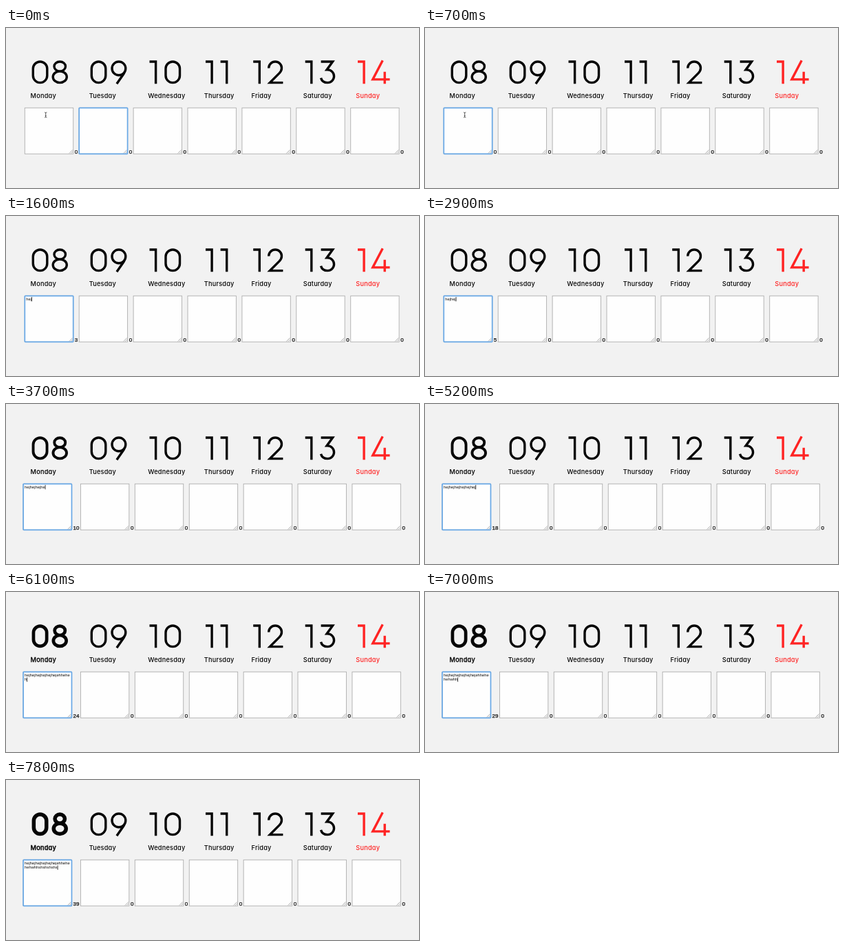
Recreate the animation shown at these times as an HTML page. Size 600 by 233 pixels, loop 8000 ms.

```html
<!DOCTYPE html>
<html lang="en">
<head>
<meta charset="utf-8">
<title>Week planner</title>
<style>
  html, body { margin: 0; width: 100%; height: 100%; overflow: hidden; background: #f2f2f2; }
  svg { display: block; width: 100vw; height: 100vh; }
  .label { font: 500 9.2px Inter, Lato, sans-serif; font-feature-settings: "cv11"; letter-spacing: 0.2px; }
  .count { font: 8px "Liberation Sans", Arial, sans-serif; fill: #111; stroke: #111; stroke-width: 0.25; }
  .typed { font: 5.8px "Liberation Sans", Arial, sans-serif; fill: #111; }
</style>
</head>
<body>
<svg id="stage" viewBox="0 0 600 233"></svg>
<script>
const LOOP = 8000, STEP = 100, LAST = 7800;
const FOCUS_AT = 200, COUNT_LAG = 80, WRAP = 24;
const TEXT = "hej".repeat(6) + "ehhehe" + "hehwhhshshshshs";
const KEYS = [
  1000, 1200, 1500, 2700, 2780, 2850, 3100, 3200, 3300, 3600, 3700, 3850,
  4180, 4400, 4500, 4700, 4900, 5050, 5400, 5500, 5600, 5750, 5870, 5960, 6050,
  6300, 6450, 6600, 6800, 6950, 7050, 7150, 7230, 7310, 7400, 7480, 7560, 7640, 7700
];
const WEIGHTS = [3.4, 3.9, 4.7, 5.5];
const BOX = { x: 27.3, y: 116.3, w: 70.4, h: 67, pitch: 78.9 };
const DIGIT = 4.45;
const INK = "#050505", RED = "#ff2323";

// name, label x, then digit and left edge pairs
const DAYS = [
  ["Monday", 35.6, "0", 37.6, "8", 66.5],
  ["Tuesday", 120.7, "0", 122.6, "9", 152.3],
  ["Wednesday", 206.3, "1", 208.5, "0", 230.3],
  ["Thursday", 287.8, "1", 290, "1", 311.6],
  ["Friday", 356.6, "1", 359.2, "2", 380],
  ["Saturday", 431.8, "1", 434.7, "3", 456],
  ["Sunday", 508.3, "1", 511, "4", 530]
];

const stage = document.getElementById("stage");

function add(parent, tag, attrs, text) {
  const el = document.createElementNS("http://www.w3.org/2000/svg", tag);
  set(el, attrs);
  if (text !== undefined) el.textContent = text;
  parent.appendChild(el);
  return el;
}
function set(el, attrs) {
  for (const k in attrs) el.setAttribute(k, attrs[k]);
}

// Closed rounded outline between two corners
function pill(x0, y0, x1, y1) {
  const rx = (x1 - x0) / 2, ry = Math.min(rx, (y1 - y0) / 2);
  const arc = `A${rx} ${ry} 0 0 1 `;
  return `M${x0} ${y0 + ry}${arc}${x1} ${y0 + ry}V${y1 - ry}${arc}${x0} ${y1 - ry}Z`;
}

// Digits stand in a band 34 high; w is the stroke width
const GLYPHS = {
  0: w => pill(w / 2, w / 2, 23.9 - w / 2, 34 - w / 2),
  1: w => `M0 ${w / 2}H${10.8 - w / 2}V34`,
  2: w => "M1.7 11.2V10.8A9.4 9.1 0 0 1 20.5 10.9C20.5 14.2 19.2 16.2 17 18.6L3.4 32.3H22.4",
  3: w => "M1.6 1.7H18.6L10 13.6H11.2A9.3 9.3 0 0 1 11.2 32.3C6.4 32.3 2.6 29.6 1.5 25.4",
  4: w => "M17.2 0L2.8 27.6H27.6M20.2 16.5V34",
  8: w => pill(1.8 + w / 2, w / 2, 21.7 - w / 2, 15.7) + pill(w / 2, 15.7, 23.5 - w / 2, 34 - w / 2),
  9: w => pill(1.7, 1.7, 21.5, 21.5) + "M21.5 11.6C21.5 14.8 20.4 17 18.7 19.4L8.6 34"
};

function addDay([name, x, ...pairs], i) {
  const color = i === 6 ? RED : INK;
  const digits = [0, 2].map(k => {
    const path = add(stage, "path", {
      transform: `translate(${pairs[k + 1]} 47.3)`, fill: "none", stroke: color
    });
    return { path, glyph: GLYPHS[pairs[k]] };
  });
  const label = add(stage, "text", {
    class: "label", x, y: 102.2, fill: color, stroke: color, "stroke-width": 0
  }, name);
  const day = { digits, label };
  setWeight(day, WEIGHTS[0]);
  return day;
}

function setWeight(day, w) {
  for (const { path, glyph } of day.digits) set(path, { d: glyph(w), "stroke-width": w });
  set(day.label, { "stroke-width": (w - WEIGHTS[0]) * 0.2 });
}

function addField(i) {
  const g = add(stage, "g", {});
  const rect = { x: 0, y: BOX.y, width: BOX.w, height: BOX.h };
  add(g, "rect", { ...rect, fill: "#fefefe", stroke: "#aeaeae", "stroke-width": 0.9 });
  const right = BOX.w - 0.8, low = BOX.y + BOX.h - 0.8;
  add(g, "path", {
    d: `M${right - 5} ${low}L${right} ${low - 5}M${right - 2.4} ${low}L${right} ${low - 2.4}`,
    stroke: "#8a8a8a", "stroke-width": 0.7
  });
  const ring = add(g, "rect", {
    ...rect, rx: 1, fill: "none", stroke: "#68a8e6", "stroke-width": 1.7
  });
  const count = add(g, "text", { class: "count", x: 72.5, y: 183.4 }, "0");
  return { g, ring, count };
}

const days = DAYS.map(addDay);
const fields = DAYS.map((_, i) => addField(i));
const first = fields[0];
const lines = [122.9, 129.4].map(y => add(first.g, "text", { class: "typed", x: 1.9, y }));
const caret = add(first.g, "rect", { width: 0.8, height: 6.4, fill: "#111" });
const pointer = add(stage, "path", {
  d: "M56 122.8Q57.7 122.8 57.7 124V129Q57.7 130.3 56 130.3M59.4 122.8Q57.7 122.8 57.7 124M57.7 129Q57.7 130.3 59.4 130.3M56.8 127.6H58.6",
  fill: "none", stroke: "#222", "stroke-width": 0.7
});

function draw(ms) {
  const t = Math.min(LAST, Math.floor((ms % LOOP) / STEP) * STEP);
  const typed = KEYS.filter(k => k <= t).length;
  const counted = KEYS.filter(k => k + COUNT_LAG <= t).length;
  const focused = t < FOCUS_AT ? 1 : 0;

  // The centred row widens when the counter gains a digit
  const shift = counted > 9 ? DIGIT / 2 : 0;
  fields.forEach((f, i) => {
    const x = BOX.x + i * BOX.pitch + (i ? shift : -shift);
    set(f.g, { transform: `translate(${x} 0)` });
    set(f.ring, { visibility: i === focused ? "visible" : "hidden" });
  });
  first.count.textContent = counted;
  setWeight(days[0], WEIGHTS[Math.min(3, Math.floor(counted / 10))]);

  const text = TEXT.slice(0, typed);
  lines[0].textContent = text.slice(0, WRAP);
  lines[1].textContent = text.slice(WRAP);
  const line = lines[typed > WRAP ? 1 : 0];
  const width = line.textContent ? line.getComputedTextLength() : 0;
  const since = t - (typed ? KEYS[typed - 1] : FOCUS_AT);
  const shown = focused === 0 && since % 1000 < 500;
  set(caret, {
    x: 1.9 + width,
    y: line.getAttribute("y") - 5,
    visibility: shown ? "visible" : "hidden"
  });
  set(pointer, { visibility: typed ? "hidden" : "visible" });
}

const start = performance.now();
function tick(now) {
  draw(Math.max(0, now - start));
  requestAnimationFrame(tick);
}
draw(0);
requestAnimationFrame(tick);
</script>
</body>
</html>
```
